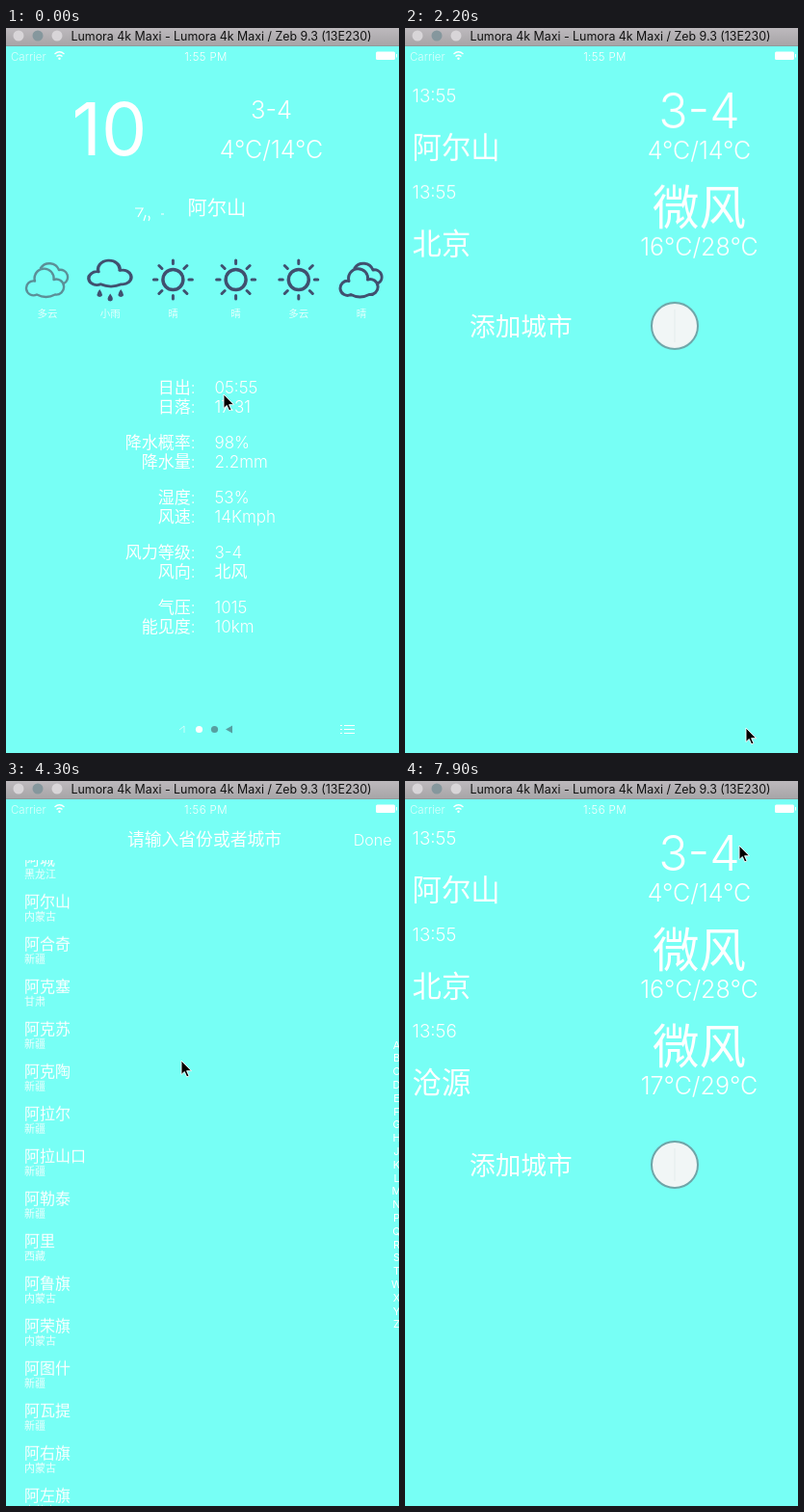
An HTML page for the animation above (8 s loop, 408x752 px).

```html
<!DOCTYPE html>
<html lang="zh-CN">
<head>
<meta charset="utf-8">
<title>Weather</title>
<style>
html, body { margin: 0; width: 100%; height: 100%; overflow: hidden; background: #77fff5; }
svg { display: block; width: 408px; height: 752px; overflow: hidden;
  font-family: Inter, "Noto Sans CJK SC", "Noto Sans CJK", "Noto Sans", sans-serif; font-weight: 350; }
text { fill: #fff; white-space: pre; }
.page { fill: #77fff5; }
.dark { fill: #35565c; font-weight: 400; }
.title { fill: #111; font-weight: 400; }
.icon { fill: none; stroke: #40506f; stroke-width: 3; stroke-linecap: round; stroke-linejoin: round; }
.drop { fill: #40506f; stroke: none; }
.ring { stroke-width: 3.5; }
.pale { stroke: #5b8f97; stroke-width: 2.4; }
.rule { stroke: #72b0ae; stroke-width: 1; }

#info, #list, #search, #cursor, #listA, #listC { animation: 8s linear infinite; }
#rules, #t55, #t56, #newRow, #add, #secA, #secC { animation: 8s step-end infinite; }
#info { animation-name: info; }
#list { animation-name: list; }
#search { animation-name: search; }
#cursor { animation-name: cursor; }
#listA { animation-name: scrollA; }
#listC { animation-name: scrollC; }
#rules { animation-name: rules; }
#t55 { animation-name: t55; }
#t56 { animation-name: t56; }
#newRow { animation-name: newRow; }
#add { animation-name: add; }
#secA { animation-name: secA; }
#secC { animation-name: secC; }

@keyframes info {
  0%, 1.25% { transform: translateY(-75px); }
  10%, 100% { transform: none; }
}
@keyframes list {
  0%, 23.75% { transform: translateY(752px); }
  25% { transform: translateY(300px); }
  26.25% { transform: translateY(70px); }
  27.5% { transform: translateY(11px); }
  28.75%, 100% { transform: translateY(0); }
}
@keyframes search {
  0%, 35% { transform: translateY(752px); }
  36.25% { transform: translateY(400px); }
  37.5% { transform: translateY(150px); }
  38.75% { transform: translateY(40px); }
  41.25%, 91.25% { transform: translateY(0); }
  92.5% { transform: translateY(90px); }
  93.75% { transform: translateY(340px); }
  95% { transform: translateY(600px); }
  96.25%, 100% { transform: translateY(752px); }
}
@keyframes cursor {
  0%, 1.25% { transform: translate(226px, 380px); }
  11.25% { transform: translate(302px, 511px); }
  22.5% { transform: translate(354px, 719px); }
  24%, 28.75% { transform: translate(354px, 726px); }
  33.75%, 36.25% { transform: translate(279px, 312px); }
  42.5%, 46.25% { transform: translate(188px, 431px); }
  52.5%, 57.5% { transform: translate(182px, 290px); }
  66.25%, 71.25% { transform: translate(403px, 299px); }
  78.75%, 91.25% { transform: translate(161px, 411px); }
  97.5%, 100% { transform: translate(347px, 67px); }
}
@keyframes scrollA {
  0%, 46.25% { transform: none; }
  56.25%, 100% { transform: translateY(-176px); }
}
@keyframes scrollC {
  0%, 72.5% { transform: none; }
  78.75%, 100% { transform: translateY(12px); }
}
@keyframes rules { 0% { opacity: 1; } 46.25%, 100% { opacity: 0; } }
@keyframes t55 { 0% { opacity: 1; } 33.75%, 100% { opacity: 0; } }
@keyframes t56 { 0% { opacity: 0; } 33.75%, 100% { opacity: 1; } }
@keyframes newRow { 0% { opacity: 0; } 80%, 100% { opacity: 1; } }
@keyframes add { 0% { transform: translateY(-100px); } 80%, 100% { transform: none; } }
@keyframes secA { 0% { opacity: 1; } 68.75%, 100% { opacity: 0; } }
@keyframes secC { 0% { opacity: 0; } 68.75%, 100% { opacity: 1; } }
</style>
</head>
<body>
<svg viewBox="0 0 408 752">
  <defs>
    <linearGradient id="bar" x2="0" y2="1">
      <stop stop-color="#bdb9bd"/><stop offset="1" stop-color="#a6a4a6"/>
    </linearGradient>
    <clipPath id="infoClip"><path d="M0 313H408V700H0z"/></clipPath>
    <clipPath id="tableClip"><path d="M0 82H408V752H0z"/></clipPath>
    <path id="cloud" d="M-11 15.500A7.500 7.500 0 1 1-13 1.500A10 10 0 1 1 6.500 0A8 8 0 1 1 8 15.500Q-1.500 20.500-11 15.500z"/>
    <g id="clouds">
      <use href="#cloud"/>
      <path d="M-7-12A10.800 10.800 0 0 1 12-10A7.500 7.500 0 0 1 17 4"/>
    </g>
    <g id="rain">
      <use href="#cloud" transform="translate(2.500 -9.500) scale(1.130 .92)"/>
      <path class="drop" d="M-11 10q-5.500 7.500 0 8q5.500-.5 0-8zM0 14.500q-5.500 7.500 0 8q5.500-.5 0-8zM11 10q-5.500 7.500 0 8q5.500-.5 0-8z"/>
    </g>
    <g id="sun">
      <circle class="ring" r="10.500"/>
      <path d="M0-16.500V-20M0 16.500V20M-16.500 0H-20M16.500 0H20M-11.500-11.500l-3-3M11.500-11.500l3-3M-11.500 11.500l-3 3M11.500 11.500l3 3"/>
    </g>
  </defs>
  <rect class="page" width="408" height="752"/>

  <g id="main">
    <g id="days"></g>
    <path d="M134 187h8l-5 9M145 194l-2 6M148 195q2 2 0 5M161 193h3" fill="none" stroke="#fff" stroke-width="1.200"/>
    <g clip-path="url(#infoClip)"><g id="info"></g></g>
    <path d="M180 728l5-4v7" fill="none" stroke="#fff" opacity=".6"/>
    <circle cx="200.500" cy="727.500" r="3.600" fill="#fff"/>
    <circle cx="216.500" cy="727.500" r="3.600" fill="#579fa0"/>
    <path d="M228 727.500l7-4v8z" fill="#579fa0"/>
    <path d="M347 723.500h2m2 0h11M347 727.500h2m2 0h11M347 731.500h2m2 0h11" stroke="#fff" stroke-width="1.200"/>
  </g>

  <g id="list">
    <rect class="page" width="408" height="752"/>
    <g id="rows"></g>
    <g id="newRow"></g>
    <g id="add">
      <circle cx="280" cy="398" r="24" fill="#f1f6f6" stroke="#6fa5a8" stroke-width="2"/>
      <path d="M280 381v34" stroke="#e3eded"/>
    </g>
  </g>

  <g id="search">
    <rect class="page" width="408" height="752"/>
    <g clip-path="url(#tableClip)">
      <g id="secA"><g id="listA"><g id="rules"></g></g></g>
      <g id="secC"><g id="listC"></g></g>
    </g>
    <g id="index"></g>
  </g>

  <g id="chrome">
    <rect width="408" height="19" fill="url(#bar)"/>
    <path d="M0 18.500H408" stroke="#8f9a9a"/>
    <circle cx="13" cy="8" r="5.500" fill="#d8d5d8"/>
    <circle cx="33" cy="8" r="5.500" fill="#85979d"/>
    <circle cx="53" cy="8" r="5.500" fill="#d8d5d8"/>
    <path d="M50.500 27q5-4.500 10 0M52.500 29.500q3-2.500 6 0" fill="none" stroke="#fff" stroke-width="1.300"/>
    <circle cx="55.500" cy="31.700" r="1.200" fill="#fff"/>
    <rect x="384" y="24.500" width="20" height="8.500" rx="1.500" fill="#fff"/>
    <path d="M405.500 27v3.500" stroke="#fff"/>
    <g id="t55"></g><g id="t56"></g>
  </g>
  <path id="cursor" d="M0 0V14.500l3.300-3 2.400 5.400 2.300-1-2.400-5.200H10.500z" fill="#000" stroke="#fff" stroke-width=".9"/>
</svg>
<script>
const $ = id => document.getElementById(id);

function add(parent, tag, attrs) {
  const el = document.createElementNS('http://www.w3.org/2000/svg', tag);
  for (const key in attrs) el.setAttribute(key, attrs[key]);
  return $(parent).appendChild(el);
}

// y is the middle of the glyphs
function write(parent, str, x, y, size, anchor = 'start', extra = {}) {
  const attrs = { x, y: y + size * 0.365, 'font-size': size, 'text-anchor': anchor, ...extra };
  add(parent, 'text', attrs).textContent = str;
}

// window title and status bar
write('chrome', 'Lumora 4k Maxi - Lumora 4k Maxi / Zeb 9.3 (13E230)', 223.5, 8.5, 12.4, 'middle', { class: 'title' });
write('chrome', 'Carrier', 5, 29.5, 11.5, 'start', { opacity: 0.75 });
write('t55', '1:55 PM', 207.5, 29.5, 11.5, 'middle', { 'letter-spacing': 0.4 });
write('t56', '1:56 PM', 207.5, 29.5, 11.5, 'middle', { 'letter-spacing': 0.4 });

// weather page
write('main', '10', 68.5, 105, 75, 'start', { 'font-weight': 400 });
write('main', '3-4', 275.5, 85, 25.5, 'middle');
write('main', '4°C/14°C', 275.5, 126, 25, 'middle');
write('main', '阿尔山', 188.5, 187, 20.3);

const days = [['clouds', '多云'], ['rain', '小雨'], ['sun', '晴'], ['sun', '晴'], ['sun', '多云'], ['clouds', '晴']];
days.forEach(([icon, label], i) => {
  const x = 43 + i * 65.2;
  add('days', 'use', { href: '#' + icon, x, y: 261, class: i ? 'icon' : 'icon pale' });
  write('days', label, x, 296, 10.5, 'middle', { opacity: 0.8 });
});

write('info', '今天:', 36, 352, 17);
write('info', '白天天气晴好，早晚会感觉偏凉，午', 88, 359, 15);
write('info', '后舒适、宜人。', 88, 377, 15);
const facts = [
  ['日出', '05:55'], ['日落', '17:31'], ['降水概率', '98%'], ['降水量', '2.2mm'],
  ['湿度', '53%'], ['风速', '14Kmph'], ['风力等级', '3-4'], ['风向', '北风'],
  ['气压', '1015'], ['能见度', '10km']
];
facts.forEach(([label, value], i) => {
  const y = 448 + (i >> 1) * 57 + (i % 2) * 20;
  write('info', label + ':', 196.5, y, 17, 'end');
  write('info', value, 216.5, y, 17);
});

// saved cities
function cityRow(parent, i, time, city, wind, temp) {
  const y = i * 100;
  write(parent, time, 7.5, y + 59.5, 18.8);
  write(parent, city, 7.5, y + 112.5, 30.4);
  write(parent, wind, 305.5, y + 75, wind === '3-4' ? 50 : 48.5, 'middle');
  write(parent, temp, 305.5, y + 116, 25, 'middle');
}
cityRow('rows', 0, '13:55', '阿尔山', '3-4', '4°C/14°C');
cityRow('rows', 1, '13:55', '北京', '微风', '16°C/28°C');
cityRow('newRow', 2, '13:56', '沧源', '微风', '17°C/29°C');
write('add', '添加城市', 67, 398, 26.7);

// city picker
function section(parent, letter, cities) {
  write(parent, letter, 19, 95, 13, 'start', { class: 'dark' });
  cities.split(' ').forEach((pair, i) => {
    const [city, province] = pair.split('/');
    write(parent, city, 19, 125 + i * 44, 16);
    write(parent, province, 19, 141 + i * 44, 11, 'start', { opacity: 0.9 });
  });
}
section('listA', 'A', '阿坝/四川 阿巴嘎/内蒙古 阿城/黑龙江 阿尔山/内蒙古 阿合奇/新疆 阿克塞/甘肃 ' +
  '阿克苏/新疆 阿克陶/新疆 阿拉尔/新疆 阿拉山口/新疆 阿勒泰/新疆 阿里/西藏 阿鲁旗/内蒙古 ' +
  '阿荣旗/内蒙古 阿图什/新疆 阿瓦提/新疆 阿右旗/内蒙古 阿左旗/内蒙古 安达/黑龙江');
section('listC', 'C', '蔡甸/湖北 蔡家湖/新疆 苍南/浙江 苍梧/广西 苍溪/四川 沧县/河北 沧源/云南 ' +
  '沧州/河北 曹妃甸/河北 曹县/山东 册亨/贵州 策勒/新疆 岑巩/贵州 岑溪/广西 察布查尔/新疆');
for (let i = 0; i < 14; i++) add('rules', 'path', { d: `M19 ${152.5 + i * 44}H398`, class: 'rule' });

write('search', '请输入省份或者城市', 206, 61, 17.8, 'middle');
write('search', 'Done', 400.5, 61, 16, 'end');
[...'ABCDEFGHJKLMNPQRSTWXYZ'].forEach((c, i) =>
  write('index', c, 405.5, 273.5 + i * 13.8, 11, 'middle', { 'font-weight': 400 }));
</script>
</body>
</html>
```
